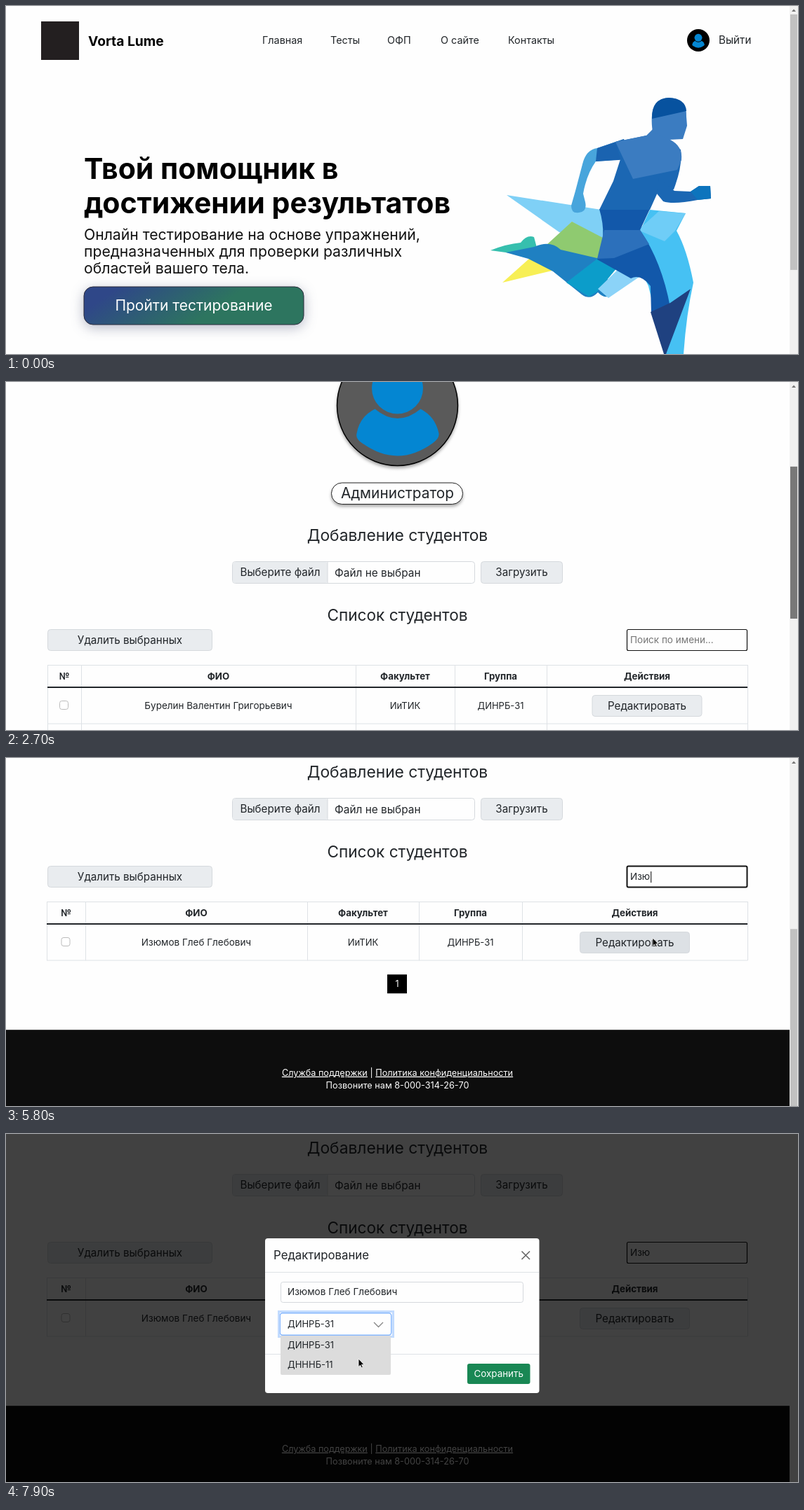
An HTML page for the animation above (8000 ms loop, 1128 by 497 pixels).

```html
<!DOCTYPE html>
<html lang="ru">
<head>
<meta charset="utf-8">
<style>
html, body { margin: 0; width: 100%; height: 100%; overflow: hidden; background: #fefefe; }
svg { display: block; width: 1128px; height: 497px; font-family: Inter, "Open Sans", sans-serif; }
text { white-space: pre; }
.soft { filter: drop-shadow(0 3px 2px #0005); }
.glow { filter: drop-shadow(0 4px 9px #27305a55); }
</style>
</head>
<body>
<svg id="stage" viewBox="0 0 1128 497"></svg>
<script>
const INK = '#212529', LINE = '#dee2e6', GREY = '#e9ecef';

// y is the middle of the line of text
const text = (s, x, y, size, { fill = INK, weight = 400, anchor = 'middle', id = '' } = {}) =>
  `<text id="${id}" x="${x}" y="${y + size * .36}" font-size="${size}" font-weight="${weight}" fill="${fill}" text-anchor="${anchor}">${s}</text>`;
const left = (s, x, y, size, o) => text(s, x, y, size, { ...o, anchor: 'start' });
const rect = (x, y, w, h, fill, more = '') => `<rect x="${x}" y="${y}" width="${w}" height="${h}" fill="${fill}" ${more}/>`;
const path = (d, fill, more = '') => `<path d="${d}" fill="${fill}" ${more}/>`;
const line = (d, color = LINE, w = 1) => path(d, 'none', `stroke="${color}" stroke-width="${w}"`);
const group = (id, inner, more = '') => `<g id="${id}" ${more}>${inner}</g>`;
const button = (s, x, y, w, h = 31, id = '') =>
  rect(x + .5, y + .5, w - 1, h - 1, GREY, `id="${id}" rx="4" stroke="#d5d9dd"`) + text(s, x + w / 2, y + h / 2, 15.2);

const person = (x, y, k) => `<g transform="translate(${x} ${y}) scale(${k})" fill="#0486d2">
  <circle cy="-24.5" r="36.5"/>
  <path d="M-58 40Q-54 16-32 5Q0 32 33 5Q54 16 59 40Q60 47 50 54Q0 90-50 54Q-60 48-58 40Z"/></g>`;

const header = rect(50, 22, 54, 55, '#231f20')
  + left('Vorta Lume', 117, 50, 19.2, { weight: 700, fill: '#000' })
  + [['Главная', 365], ['Тесты', 462], ['ОФП', 543], ['О сайте', 619], ['Контакты', 715]]
    .map(([s, x]) => left(s, x, 49, 14.4)).join('')
  + '<circle cx="986" cy="49" r="16"/>' + person(986, 49, .15)
  + left('Выйти', 1015, 49, 15.2);

const runner = [
  ['M713 270L848 291 858 340 788 323Z', '#7fd0f6'],
  ['M707 395L745 361 774 340 806 308 842 332 782 377Z', '#f7ef55'],
  ['M770 341L806 308 850 331 842 366 800 352Z', '#8fca70'],
  ['M917 291L968 296 955 321Q970 348 979 395Q969 440 965 497L938 497 915 400 890 350Z', '#46c1f3'],
  ['M930 293L968 296 953 321 938 336 900 320Z', '#6fcdf7'],
  ['M690 349Q712 340 733 338Q742 326 752 330L756 345 742 356 712 352Z', '#36bfae'],
  ['M712 352L752 344Q775 334 790 348L850 362 862 412Q854 420 843 409Q832 421 820 412L779 379 744 361Z', '#1f80c2'],
  ['M798 395L842 361 880 362 842 408 830 415Z', '#0c9dca'],
  ['M843 404L874 374 912 380 858 417Z', '#8bd3f8'],
  ['M845 290L917 290 903 320Q934 365 946 430L940 497 919 438 918 400Q904 382 890 389L842 362Q857 330 845 290Z', '#1258aa'],
  ['M918 437L946 424 975 404 940 497 937 497Z', '#1f4180'],
  ['M852 320L903 320 916 340 866 360 842 361Z', '#2c70bb'],
  ['M880 190L842 203Q826 205 821 226L811 264 805 285Q805 297 816 295Q828 294 825 280L822 268Q827 240 840 222L878 219Z', '#48a5dc'],
  ['M842 203L880 190 888 219 840 222Z', '#1a63b0'],
  ['M868 194L912 185 961 205Q964 228 951 262L930 262 917 291 845 291 865 250 875 219Z', '#1b67b3'],
  ['M868 194L912 185 921 176 946 191Q964 200 962 220L956 234 893 247Z', '#3b7cc1'],
  ['M930 245L952 264 975 265 987 257 1003 257 1004 275 985 277Q950 284 936 279L927 268Z', '#1b67b3'],
  ['M975 265L987 257 1003 257 1004 275 985 277Z', '#0d74bd'],
  ['M921 180Q914 132 944 131Q970 132 969 158L970 171 964 190 944 191Z', '#3b7cc1'],
  ['M920 161Q919 132 944 131Q968 132 969 150Z', '#07529f']
].map(([d, c]) => path(d, c)).join('');

const home = header + runner
  + left('Твой помощник в', 111, 232, 41, { weight: 700, fill: '#000' })
  + left('достижении результатов', 111, 281, 41, { weight: 700, fill: '#000' })
  + ['Онлайн тестирование на основе упражнений,', 'предназначенных для проверки различных', 'областей вашего тела.']
    .map((s, i) => left(s, 111, 326 + i * 24, 21.2, { fill: '#111' })).join('')
  + rect(111, 401, 313, 54, 'url(#grad)', 'rx="13" stroke="#2a2a3a" class="glow"')
  + text('Пройти тестирование', 267.5, 427, 21, { fill: '#fff' });

function table(id, xs, names) {
  const mid = i => (xs[i] + xs[i + 1]) / 2;
  const end = 697 + 51.2 * names.length, foot = end + 99;
  const heads = ['№', 'ФИО', 'Факультет', 'Группа', 'Действия']
    .map((s, i) => text(s, mid(i), 680, 13.3, { weight: 700 })).join('');
  const rows = names.map((name, i) => {
    const y = 722.5 + 51.1 * i;
    return rect(mid(0) - 6.5, y - 7, 12, 12, '#fff', 'rx="3" stroke="#bbb"')
      + text(name, mid(1), y, 13.5) + text('ИиТИК', mid(2), y, 13) + text('ДИНРБ-31', mid(3), y, 13)
      + button('Редактировать', mid(4) - 78.5, y - 15.5, 157, 31, `${id}Edit${i}`)
      + line(`M${xs[0]} ${y + 25.5}H1056`);
  }).join('');
  return group(id, line(`M${xs[0]} 664.5H1056`)
    + [...xs].map(x => line(`M${x + .5} 664V${end}`)).join('')
    + heads + rows + line(`M${xs[0]} 696H1056`, INK, 2)
    + rect(543, end + 20, 28, 27, '#000') + text('1', 557, end + 33.5, 12.5, { fill: '#fff' })
    + rect(0, foot, 1116, 140, '#0d0d0d')
    + text('<tspan text-decoration="underline">Служба поддержки</tspan> | <tspan text-decoration="underline">Политика конфиденциальности</tspan>', 557.5, foot + 61, 12.7, { fill: '#fff' })
    + text('Позвоните нам 8-000-314-26-70', 557.5, foot + 79, 12.7, { fill: '#fff' }));
}

const profile = header
  + text('Профиль', 557.5, 147, 26.4)
  + '<circle cx="557.5" cy="293.5" r="86" fill="#5a5a5a" stroke="#000" stroke-width="1.5" class="soft"/>'
  + person(557.5, 293.5, 1)
  + rect(463.5, 404, 187, 30.5, '#fefefe', 'rx="15" stroke="#222" class="soft"')
  + text('Администратор', 557.5, 419, 20.8)
  + text('Добавление студентов', 557.5, 479, 22.8)
  + rect(322.5, 516.5, 345, 31, '#fefefe', 'rx="4" stroke="#d5d9dd"')
  + rect(323, 517, 135, 30, GREY, 'rx="3"') + line('M458 517V547', '#d5d9dd')
  + text('Выберите файл', 390.5, 532, 15.2) + left('Файл не выбран', 468, 532, 15.4)
  + button('Загрузить', 676, 516, 117, 32)
  + text('Список студентов', 557.5, 593, 22.6)
  + button('Удалить выбранных', 59, 613, 235)
  + rect(884.5, 613.5, 171, 30, '#fefefe', 'id="search" rx="2" stroke="#111"')
  + left('', 889, 628.5, 13.5, { id: 'query' }) + rect(0, 621, 1, 16, '#000', 'id="caret"')
  + table('all', [59, 107, 498, 639, 770, 1056], ['Бурелин Валентин Григорьевич', 'Ладугин Тимофей Эдуардович',
    'Изюмов Глеб Глебович', 'Рябинов Степан Валерьевич', 'Излучьев Петр Романович'])
  + table('found', [58, 113, 429, 588, 735, 1056], ['Изюмов Глеб Глебович']);

const modal = rect(369, 149, 390.5, 221, '#fefefe', 'rx="4"')
  + left('Редактирование', 381, 173, 16.8) + line('M734.5 167.5L746 179M746 167.5L734.5 179', '#666', 1.6)
  + line('M369 197.5H759M369 314.5H759')
  + rect(391.5, 211.5, 345, 29, '#fefefe', 'rx="3" stroke="#d5d9dd"') + left('Изюмов Глеб Глебович', 401, 225.5, 13.5)
  + rect(391, 256.5, 157, 30, '#fefefe', 'id="select" rx="3" stroke="#d5d9dd"')
  + left('ДИНРБ-31', 401, 271.5, 13) + line('M524 269L530.5 275.5 537 269', '#888', 1.4)
  + rect(657, 328, 89.5, 29, '#198754', 'rx="3"') + text('Сохранить', 701.7, 342.5, 13.4, { fill: '#fff' })
  + group('options', rect(391, 288, 157, 56, '#dcdcdc', 'rx="2"')
    + left('ДИНРБ-31', 401, 301, 13) + left('ДНННБ-11', 401, 329, 13));

document.getElementById('stage').innerHTML =
  `<defs><linearGradient id="grad" x2="1" y2=".25"><stop offset=".15" stop-color="#2f4788"/><stop offset=".7" stop-color="#2d755f"/></linearGradient></defs>`
  + rect(0, 0, 1128, 497, '#fefefe')
  + group('home', home) + group('profile', profile)
  + group('loader', '<circle r="15.8" fill="none" stroke="#dcdcdc" stroke-width="4.5"/>'
    + group('arc', line('M12 -3.2A12.4 12.4 0 1 1 -4 -11.7', '#000', 3.4)), 'transform="translate(557.5 259)"')
  + group('bar', rect(1116, 0, 12, 497, '#f1f1f1') + path('M1119 8L1122 4.5 1125 8Z', '#777') + rect(1117, 12, 10, 100, '#c1c1c1', 'id="thumb"'))
  + rect(0, 0, 1128, 497, '#000', 'id="shade"') + group('modal', modal)
  + group('arrow', path('M0 0V11.5L2.6 9.2 4.5 13 6.3 12.2 4.5 8.4H8Z', '#000', 'stroke="#fff" stroke-width=".8"'))
  + group('beam', line('M-2.5 -6H2.5M0 -6V6M-2.5 6H2.5', '#222', 1.1));

const el = id => document.getElementById(id);
const set = (id, attrs) => { for (const k in attrs) el(id).setAttribute(k, attrs[k]); };
const show = (id, on) => set(id, { visibility: on ? 'visible' : 'hidden' });

// values between [time, ...values] keys
function track(keys, t) {
  const i = keys.findIndex(k => k[0] > t);
  if (i < 0) return keys[keys.length - 1].slice(1);
  if (!i) return keys[0].slice(1);
  const [a, b] = [keys[i - 1], keys[i]], u = (t - a[0]) / (b[0] - a[0]);
  return a.slice(1).map((v, j) => v + (b[j + 1] - v) * u);
}
const pointer = [[300, 1097, 23], [400, 1060, 24], [500, 1016, 29], [600, 992, 34], [800, 981, 36], [1000, 981, 36],
  [1200, 993, 37], [1600, 993, 37], [1900, 1061, 23], [2100, 1118, 42], [2300, 1132, 61], [2900, 1132, 200],
  [3100, 1120, 239], [3300, 1121, 249], [3800, 939, 130], [5200, 939, 130], [5800, 921, 257], [6600, 921, 257],
  [7000, 749, 263], [7100, 669, 265], [7200, 573, 261], [7400, 520, 266], [7600, 520, 266], [7900, 502, 321]];
const scrolling = [[2000, 0], [2100, 8], [2300, 47], [3100, 473], [3300, 497]];
const fading = [[6100, 0, 0, -50], [6200, .45, .08, -44], [6300, .74, .28, -31], [6400, .74, .75, -9], [6500, .74, 1, 0]];

function draw(now) {
  const t = Math.floor(now % 8000 / 100) * 100;
  const loading = t >= 1200 && t < 1600, filtered = t >= 4700, dragging = t >= 2100 && t < 3400;

  show('home', t < 1600);
  set('home', { style: loading ? 'filter:brightness(0);opacity:.03' : '' });
  show('loader', loading);
  set('arc', { transform: `rotate(${(t - 1200) * .36})` });

  const scroll = filtered ? 459 : track(scrolling, t)[0];
  set('profile', { transform: `translate(0 ${-scroll})`, display: t < 1600 ? 'none' : 'inline' });
  set('all', { display: filtered ? 'none' : 'inline' });
  set('found', { display: filtered ? 'inline' : 'none' });
  set('foundEdit0', { fill: t >= 5700 && t < 6200 ? '#dde1e5' : GREY });

  const typed = 'Изю'.slice(0, t < 4600 ? 0 : t < 4700 ? 1 : t < 5100 ? 2 : 3);
  const focus = t >= 4300 && t < 6000;
  el('query').textContent = typed || 'Поиск по имени...';
  set('query', { fill: typed ? INK : '#757575' });
  set('search', { 'stroke-width': focus ? 2 : 1.2 });
  set('caret', { x: 890 + (typed ? el('query').getComputedTextLength() : 0), display: focus ? 'inline' : 'none' });

  const doc = t < 1200 ? 704 : loading ? 1157 : filtered ? 978 : 1183, ratio = 495 / doc;
  set('thumb', { y: 12 + scroll * ratio, height: 519 * ratio, fill: dragging ? '#787878' : '#c1c1c1' });
  show('bar', t < 6200);

  const [dark, alpha, drop] = track(fading, t), open = t >= 7500;
  set('shade', { opacity: dark });
  set('modal', { opacity: alpha, transform: `translate(0 ${drop})` });
  set('select', { stroke: open ? '#86b7fe' : '#d5d9dd', style: open ? 'outline:3px solid #c2dbfe;outline-offset:0;paint-order:stroke' : '', 'stroke-width': open ? 3 : 1 });
  set('options', { display: open ? 'inline' : 'none' });

  const [x, y] = track(pointer, t), beam = t >= 3800 && t < 4700;
  show('arrow', t >= 300 && !beam);
  show('beam', beam);
  for (const id of ['arrow', 'beam']) set(id, { transform: `translate(${x} ${y})` });
}

function frame(now) {
  draw(now);
  requestAnimationFrame(frame);
}
draw(0);
requestAnimationFrame(frame);
</script>
</body>
</html>
```
